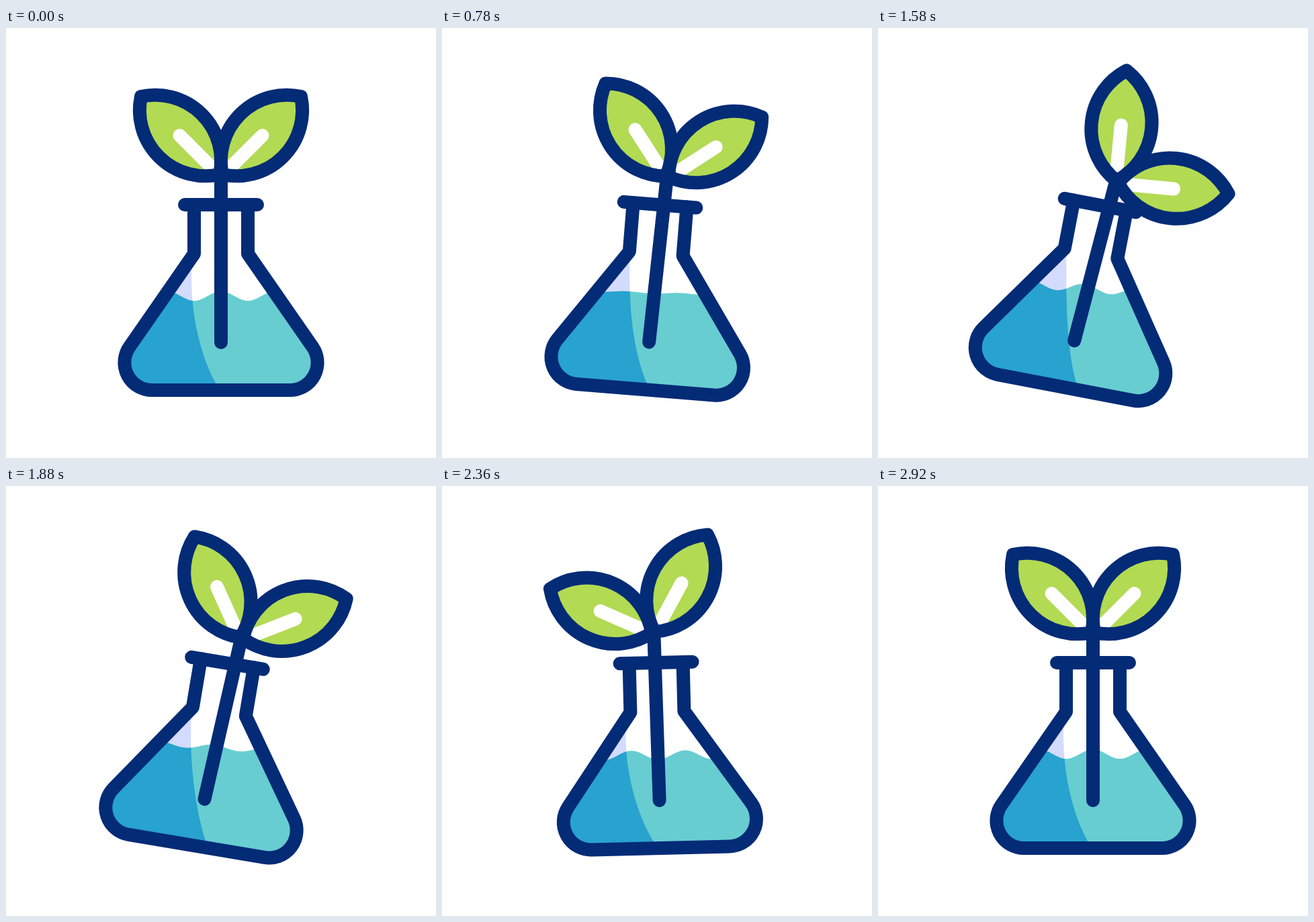
Recreate the animation shown at these times as an HTML page with a canvas. Size 640x640 px, loop 3600 ms.

```html
<!DOCTYPE html>
<html lang="en">
<head>
<meta charset="utf-8">
<title>Sprout in a flask</title>
<style>
  html, body { margin: 0; width: 100%; height: 100%; overflow: hidden; background: #fff; }
  canvas { display: block; width: 640px; height: 640px; }
</style>
</head>
<body>
<canvas id="stage" width="640" height="640"></canvas>
<script>
const ctx = document.getElementById('stage').getContext('2d');
const LOOP = 3600, BEGIN = 440, END = 2920;
const NAVY = '#042b76', BLUE = '#28a2ce', TEAL = '#67cdd1', LAVENDER = '#d3dbff', GREEN = '#b2da53';

// Cosine easing from key to key, each key being [time, value].
function swing(t, ...keys) {
  const next = keys.findIndex(([time]) => t < time);
  if (next === 0) return keys[0][1];
  if (next < 0) return keys[keys.length - 1][1];
  const [t0, v0] = keys[next - 1], [t1, v1] = keys[next];
  return v0 + (v1 - v0) * (1 - Math.cos(Math.PI * (t - t0) / (t1 - t0))) / 2;
}

const flaskAngle = t => swing(t, [BEGIN, 0], [1150, 9.8], [1480, 11.1], [1820, 9.8], [2460, -2.1], [2880, 0]);
const leafAngle = t => swing(t, [BEGIN, 0], [1500, 52], [2350, -19], [2880, 0]);
const leafSpread = t => swing(t, [1580, 0], [2160, 2.8], [END, 0]);
const shadeDrift = t => swing(t, [BEGIN, 0], [1200, 8], [2160, -3], [END, 0]);

const glass = new Path2D();
glass.moveTo(280, 263);
glass.lineTo(280, 336);
glass.arcTo(139, 539, 320, 539, 41);
glass.arcTo(501, 539, 360, 336, 41);
glass.lineTo(360, 336);
glass.lineTo(360, 263);
const rim = new Path2D('M266 263H374');
const leaf = new Path2D('M201 102A98 98 0 0 1 318 218A98 98 0 0 1 201 102Z');
const vein = new Path2D('M258.5 160L307 208.5');

function stroke(path, color = NAVY) {
  ctx.strokeStyle = color;
  ctx.stroke(path);
}

function fill(path, color) {
  ctx.fillStyle = color;
  ctx.fill(path);
}

function rotate(degrees, x, y) {
  ctx.translate(x, y);
  ctx.rotate(degrees * Math.PI / 180);
  ctx.translate(-x, -y);
}

// A standing wave that swings twice while the flask moves, tilting with it.
function surface(t, angle) {
  const progress = Math.min(Math.max((t - BEGIN) / (END - BEGIN), 0), 1);
  const height = 7 * Math.cos(4 * Math.PI * progress);
  const crest = 320 - 1.3 * angle;
  const path = new Path2D('M100 600');
  for (let x = 100; x <= 540; x += 2) {
    const level = 399 - angle + .007 * angle * (x - 320);
    path.lineTo(x, level - height * Math.cos((x - crest) * Math.PI / 40));
  }
  path.lineTo(540, 600);
  path.closePath();
  return path;
}

function shadow(t, angle) {
  const top = 276 + shadeDrift(t), bottom = 313 - 1.6 * angle;
  return new Path2D(`M100 300H${top}V372C${top} 430 ${bottom - 23 + angle} 490 ${bottom} 530
    L${bottom + 6} 545V600H100Z`);
}

function drawContents(t, angle) {
  const liquid = surface(t, angle), shade = shadow(t, angle);
  ctx.save();
  rotate(angle, 320, 320);
  ctx.clip(glass);
  rotate(-angle, 320, 320);
  fill(shade, LAVENDER);
  fill(liquid, TEAL);
  ctx.clip(liquid);
  fill(shade, BLUE);
  ctx.restore();
}

function drawLeaf(side, spread) {
  ctx.save();
  ctx.translate(320, 0);
  ctx.scale(side, 1);
  ctx.translate(-320, 0);
  rotate(-spread, 320, 222);
  fill(leaf, GREEN);
  stroke(vein, '#fff');
  stroke(leaf);
  ctx.restore();
}

function draw(t) {
  const angle = flaskAngle(t), stemAngle = angle * 1.35, sink = angle * .4;
  ctx.fillStyle = '#fff';
  ctx.fillRect(0, 0, 640, 640);
  ctx.lineWidth = 20;
  ctx.lineCap = ctx.lineJoin = 'round';

  drawContents(t, angle);
  ctx.save();
  rotate(angle, 320, 320);
  stroke(glass);
  stroke(rim);
  rotate(stemAngle - angle, 320, 468);
  stroke(new Path2D(`M320 ${222 + sink}V468`));
  ctx.translate(0, sink);
  rotate(leafAngle(t) - stemAngle, 320, 222);
  for (const side of [1, -1]) drawLeaf(side, leafSpread(t));
  ctx.restore();
}

const start = performance.now();
function tick() {
  draw((performance.now() - start) % LOOP);
  requestAnimationFrame(tick);
}
tick();
</script>
</body>
</html>
```
